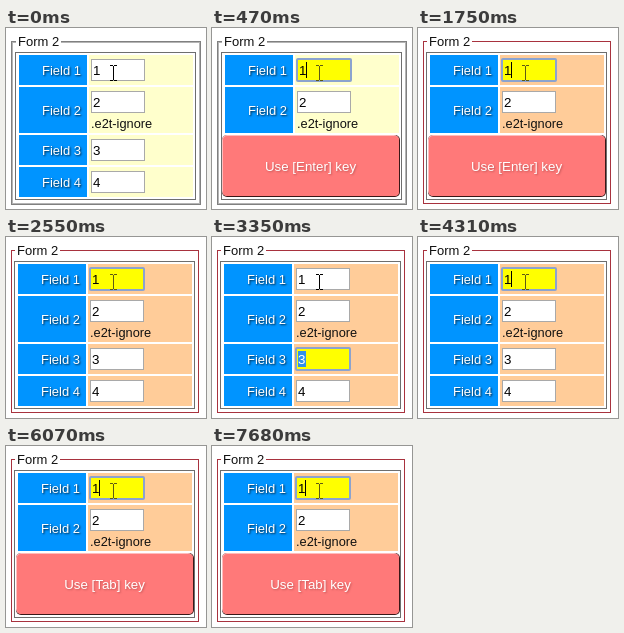
Write an HTML page with a canvas that moves like this. It is 200 px wide and 181 px high and loops after 8 s.

```html
<!DOCTYPE html>
<html lang="en">
<head>
<meta charset="utf-8">
<title>Form 2</title>
<style>
html, body { margin: 0; width: 100%; height: 100%; overflow: hidden; background: #fff; }
canvas { display: block; }
</style>
</head>
<body>
<canvas id="stage"></canvas>
<script>
const W = 200, H = 181, LOOP = 8000;
const FONT = '"Liberation Sans", Arial, sans-serif';
const canvas = document.getElementById('stage');
const ctx = canvas.getContext('2d');
const scale = window.devicePixelRatio || 1;
canvas.width = W * scale;
canvas.height = H * scale;
canvas.style.width = W + 'px';
canvas.style.height = H + 'px';

// Each step: start time, then the values that change there.
const STEPS = [
  [0, { skin: 'light', focus: 0, popup: '', caret: false }],
  [470, { focus: 1, popup: 'Use [Enter] key', caret: true }],
  [950, { skin: 'warm' }],
  [1270, { caret: false }],
  [1750, { caret: true }],
  [2550, { popup: '', caret: false }],
  [2870, { caret: true }],
  [3350, { focus: 3 }],
  [3670, { focus: 4 }],
  [4310, { focus: 1, caret: true }],
  [4630, { caret: false }],
  [5110, { caret: true }],
  [5590, { caret: false }],
  [5920, { caret: true }],
  [6070, { popup: 'Use [Tab] key' }],
  [6400, { caret: false }],
  [6720, { caret: true }],
  [7360, { caret: false }],
  [7680, { caret: true }]
];

// The light skin has a two pixel groove, the warm one a thin red line.
const SKINS = {
  light: { dx: 1, cell: '#ffffcc', outer: '#808080', groove: '#b4b4b4', right: 195, bottom: 177 },
  warm: { dx: 0, cell: '#ffcc99', outer: '#a8323e', groove: '', right: 193, bottom: 176 }
};

// Row top, row height, input top
const ROWS = [[27, 30, 31], [59, 46, 63], [107, 30, 111], [139, 30, 143]];

function stateAt(t) {
  const state = {};
  for (const [start, change] of STEPS) if (start <= t) Object.assign(state, change);
  return state;
}

function rect(x, y, w, h, color) {
  ctx.fillStyle = color;
  ctx.fillRect(x, y, w, h);
}

function frame(x, y, w, h, color) {
  ctx.strokeStyle = color;
  ctx.lineWidth = 1;
  ctx.strokeRect(x + 0.5, y + 0.5, w - 1, h - 1);
}

function text(str, x, y, size, color, align = 'left', shadow = '') {
  ctx.save();
  ctx.font = `${size}px ${FONT}`;
  ctx.textAlign = align;
  ctx.fillStyle = color;
  if (shadow) {
    ctx.shadowColor = shadow;
    ctx.shadowOffsetX = ctx.shadowOffsetY = scale;
    ctx.shadowBlur = 2 * scale;
  }
  ctx.fillText(str, x, y);
  ctx.restore();
}

function fillRound(x, y, w, h, r, color) {
  ctx.beginPath();
  ctx.roundRect(x, y, w, h, r);
  ctx.fillStyle = color;
  ctx.fill();
}

function drawFieldset(skin) {
  const { dx, outer, groove, right, bottom } = skin;
  const w = right - 5, h = bottom - 13;
  if (groove) frame(6, 14, w - 2, h - 2, groove);
  frame(5, 13, w, h, outer);
  rect(9 + dx, 8, 45, 14, '#fff');
  text('Form 2', 11 + dx, 18, 13, '#111');
  frame(8 + dx, 24, 181, 148, '#6e6e6e');
}

function drawInput(n, top, left, focused, caret) {
  if (focused) {
    fillRound(left - 1, top - 1, 56, 24, 2, '#8ba3cf');
    rect(left + 1, top + 1, 52, 20, '#ffff00');
  } else {
    rect(left, top, 54, 22, '#fff');
    frame(left, top, 54, 22, '#a9a9a9');
  }
  const selected = focused && n > 1;
  if (selected) rect(left + 2, top + 3, 8, 16, '#3390e8');
  text(n, left + 2, top + 16, 13.33, selected ? '#fff' : '#000');
  if (focused && n === 1 && caret) rect(left + 9, top + 3, 1, 16, '#000');
}

function drawRow(i, skin, state) {
  const [y, h, top] = ROWS[i];
  const n = i + 1, { dx } = skin;
  rect(12 + dx, y, 68, h, '#0094ff');
  rect(82 + dx, y, 104, h, skin.cell);
  text('Field ' + n, 74 + dx, y + h / 2 + 5, 13, '#fff', 'right', 'rgba(0,0,0,.75)');
  drawInput(n, top, 84 + dx, state.focus === n, state.caret);
  if (n === 2) text('.e2t-ignore', 84 + dx, 100, 12.8, '#111');
}

// Raised button: light edge at top left, dark edge at bottom right.
function drawPopup(label) {
  rect(10, 107, 178, 62, '#fff');
  fillRound(10, 107, 178, 62, 5, '#3a1717');
  fillRound(10, 107, 177, 61, 5, '#ffbcbc');
  fillRound(11, 108, 176, 60, 4, '#ff7979');
  text(label, 98.5, 143, 13.33, '#fff', 'center', 'rgba(110,40,40,.4)');
}

function drawPointer(color) {
  rect(107, 38, 1, 14, color);
  for (const y of [37, 52]) {
    rect(104, y, 3, 1, color);
    rect(108, y, 3, 1, color);
  }
}

function draw(t) {
  const state = stateAt(t);
  const skin = SKINS[state.skin];
  ctx.setTransform(scale, 0, 0, scale, 0, 0);
  rect(0, 0, W, H, '#fff');
  drawFieldset(skin);
  ROWS.forEach((_, i) => drawRow(i, skin, state));
  if (state.popup) drawPopup(state.popup);
  drawPointer(state.focus === 1 ? '#5e5a14' : '#000');
}

const begin = performance.now();
function tick() {
  draw((performance.now() - begin) % LOOP);
  requestAnimationFrame(tick);
}
tick();
</script>
</body>
</html>
```
